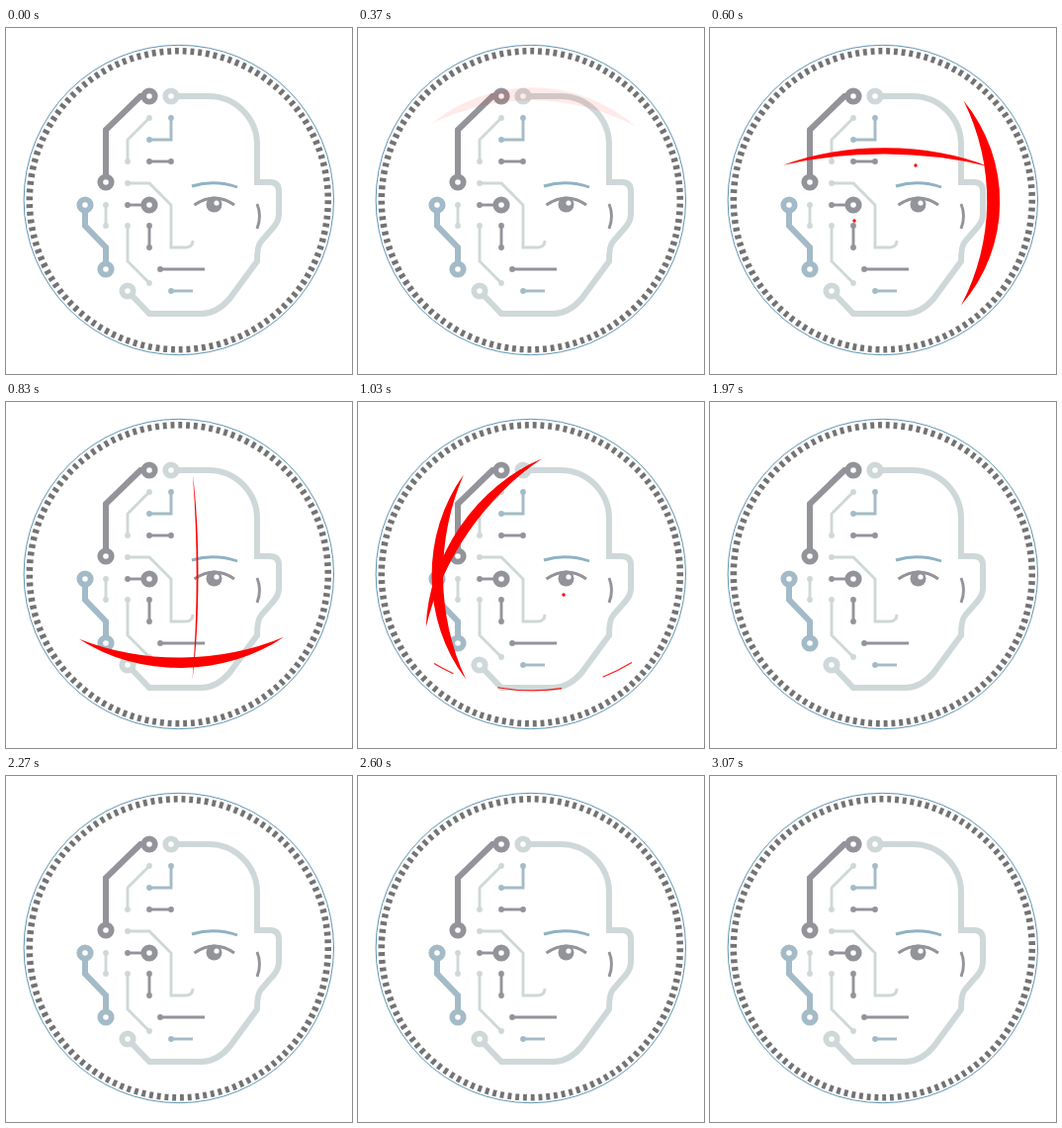
These frames come from a looping animation (350 by 350 pixels, 3110 ms). An HTML page:

```html
<!DOCTYPE html>
<html>
<head>
<meta charset="utf-8">
<style>
html, body { margin: 0; width: 100%; height: 100%; overflow: hidden; background: #fff; }
svg { display: block; width: 100vw; height: 100vh; }
path { fill: none; stroke: currentColor; stroke-width: 2.9; }
.wide { stroke-width: 6; }
.dot { fill: currentColor; }
.node { fill: #fff; stroke: currentColor; stroke-width: 5.8; }
.blade { fill: currentColor; stroke: none; }
.rim { stroke-width: 1.2; stroke-dasharray: 22 47 65 43 35; }
</style>
</head>
<body>
<svg viewBox="0 0 350 350">
  <circle cx="174.8" cy="174" r="156.7" fill="none" stroke="#5f96b0"/>
  <circle id="ring" cx="174.8" cy="174.3" r="151" fill="none" stroke="#737373" stroke-width="6.5" pathLength="244" stroke-dasharray="1"/>
  <g id="face"></g>
  <g id="blades" color="#f00"></g>
  <g id="sparks" color="#f00"></g>
</svg>
<script>
const LOOP = 3110, SWEEP = 511;
const LIGHT = '#cfd8d8', BLUE = '#a3bbc7', DARK = '#93939a';
const $ = id => document.getElementById(id);
const clamp = v => Math.max(0, Math.min(1, v));

function add(parent, tag, attrs) {
  const el = document.createElementNS('http://www.w3.org/2000/svg', tag);
  for (const k in attrs) el.setAttribute(k, attrs[k]);
  return parent.appendChild(el);
}

// A circuit trace, optionally capped with a dot or a ring node at each end
function trace(color, d, first, last = first) {
  const g = add($('face'), 'g', { color });
  const line = add(g, 'path', { d });
  if (first === 'node') line.setAttribute('class', 'wide');
  [[first, 0], [last, line.getTotalLength()]].forEach(([cap, at]) => {
    if (!cap) return;
    const { x, y } = line.getPointAtLength(at);
    add(g, 'circle', { class: cap, cx: x, cy: y, r: cap === 'node' ? 5.7 : 2.9 });
  });
}

trace(LIGHT, 'M167 69H205C232 69 254 91 254 118V156H267Q276 156 276 165V188Q276 195 271 201L258 216Q254 220 254 236L226 274Q213 289 198 289H145L123 266', 'node');
trace(DARK, 'M145 69H136L101 103V156', 'node');
trace(BLUE, 'M80 179V200L101 222V244', 'node');

trace(LIGHT, 'M145 91L123 113V135', 'dot');
trace(LIGHT, 'M101 179V200', 'dot');
trace(LIGHT, 'M123 200V236L145 258', 'dot');
trace(LIGHT, 'M123 157H145L167 179V222H181Q189 222 189 215', 'dot', null);
trace(BLUE, 'M167 91V113H145', 'dot');
trace(BLUE, 'M167 266H189', 'dot', null);
trace(DARK, 'M145 135H167', 'dot');
trace(DARK, 'M145 200V222', 'dot');
trace(DARK, 'M123 179H145', 'dot', 'node');
trace(DARK, 'M156 244H201', 'dot', null);

trace('#8fb2c3', 'M188 160Q211 153 234 161');
trace(DARK, 'M190.5 179Q211 165 231 179');
trace(DARK, 'M254 178Q259 190 254 203');
add($('face'), 'circle', { cx: 210.5, cy: 178.5, r: 8, fill: DARK });
add($('face'), 'circle', { cx: 213, cy: 177, r: 2.6, fill: '#fff' });

// Crescents swing half a turn about an axis in the picture plane
const blades = [
  { start: 426, angle: 270 },
  { start: 600, angle: 0 },
  { start: 918, angle: 214 }
].map(b => {
  const g = add($('blades'), 'g', {});
  const body = add(g, 'path', { class: 'blade', d: 'M79.5-103A160 160 0 0 1 77 104A227 227 0 0 0 79.5-103Z' });
  const rim = add(g, 'path', { class: 'rim', d: 'M88-100A193 193 0 0 1 87 100' });
  return { ...b, g, body, rim };
});

// Sparks blink on the corners of a box around the face centre
const sparks = [[1, -1, 600], [-1, 1, 600], [1, 1, 1030]].map(([sx, sy, at]) =>
  ({ at, el: add($('sparks'), 'circle', { class: 'dot', cx: 177 + 31 * sx, cy: 167 + 28 * sy, r: 1.7 }) }));

function draw(now) {
  const t = now % LOOP;
  $('ring').setAttribute('transform', `rotate(${60 * t / LOOP} 174.8 174.3)`);
  for (const b of blades) {
    const age = t - b.start, over = age - SWEEP;
    const tilt = Math.cos(Math.PI * clamp(age / SWEEP));
    b.g.setAttribute('transform', `translate(177 176.5) rotate(${b.angle}) scale(${tilt} 1)`);
    b.body.setAttribute('opacity', clamp(1 + age / 60) * clamp(1 - over / 75));
    b.rim.setAttribute('opacity', over > 0 ? clamp((130 - over) / 40) : 0);
  }
  for (const s of sparks) s.el.setAttribute('opacity', Math.abs(t - s.at) < 50 ? 1 : 0);
}

function tick() {
  draw(performance.now());
  requestAnimationFrame(tick);
}
tick();
</script>
</body>
</html>
```
